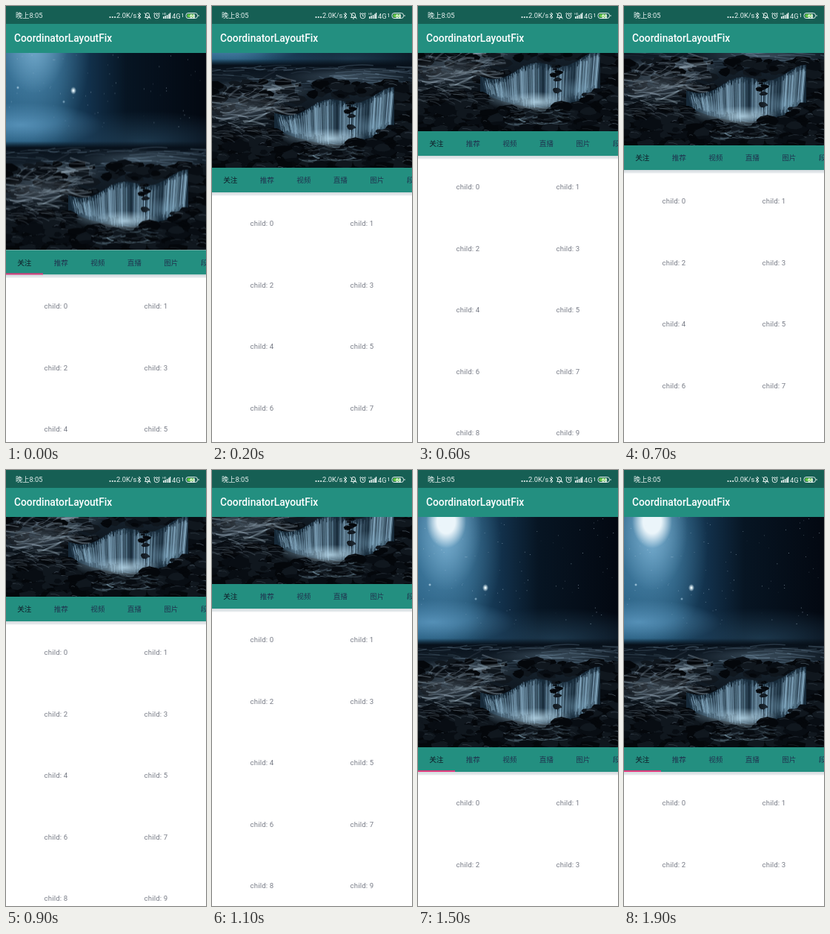
Write an HTML page with a canvas that moves like this. It is 270 px wide and 585 px high and loops after 2 s.

```html
<!DOCTYPE html>
<html lang="zh">
<head>
<meta charset="utf-8">
<style>
html, body { margin: 0; width: 100%; height: 100%; overflow: hidden; background: #fff; }
#stage { position: relative; width: 270px; height: 585px; overflow: hidden; background: #fff;
  font: 9.625px Roboto, "Noto Sans CJK SC", "Noto Sans CJK", sans-serif; }
#stage div, canvas, svg { position: absolute; }
#content { top: 0; left: 0; width: 270px; }
#photo { top: 62px; left: 0; }
#tabs { top: 372px; width: 270px; height: 33px; background: #238f80; overflow: hidden; }
#tabs div { width: 49.5px; text-align: center; line-height: 33px; color: #20344f; white-space: nowrap; }
#tabs div.on { color: #101a26; }
#indicator { top: 403.4px; width: 49.5px; height: 1.6px; background: #e0397c; }
#shadow { top: 405px; width: 270px; height: 5px; background: linear-gradient(#d3d9dd, #e6eaed 70%, #fff); }
.child { width: 135px; text-align: center; line-height: 14px; color: #777b86; letter-spacing: .018em; }
#status { top: 0; width: 270px; height: 24px; background: #165f54; }
#bar { top: 24px; width: 270px; height: 38.5px; background: #238f80; color: #fff;
  font-size: 13.75px; font-weight: 500; line-height: 39px; text-indent: 11px; }
svg { top: 0; left: 0; }
</style>
</head>
<body>
<div id="stage">
  <div id="content">
    <canvas id="photo" width="270" height="310"></canvas>
    <div id="tabs"></div>
    <div id="shadow"></div>
    <div id="indicator"></div>
  </div>
  <div id="status"></div>
  <div id="bar">CoordinatorLayoutFix</div>
  <svg width="270" height="24" fill="none" stroke="#e4efed" stroke-width="1">
    <g fill="#e8f2f0" stroke="none" font-size="9.3">
      <text x="13" y="16.3" textLength="">晚上8:05</text>
      <circle cx="140.5" cy="15" r="1.1"/><circle cx="143.8" cy="15" r="1.1"/><circle cx="147.1" cy="15" r="1.1"/>
      <text id="speed" x="149" y="16.3">2.0K/s</text>
      <text x="224" y="16.6">4G</text>
      <text x="211" y="12" font-size="4">HD</text>
      <path d="M212 17v-3h1.6v3zM214.4 17v-4h1.6v4zM216.8 17v-5h1.6v5zM219.2 17v-6.5h1.6v6.5zM221 17v-8h1.3v8z"/>
    </g>
    <path d="M177.5 10.5l4.5 4.5-2.2 2v-8l2.2 2-4.5 4.5" stroke-width=".9"/>
    <path d="M187.5 15.5h7l-1-1.5v-2.2a2.5 2.5 0 0 0-5 0v2.2zM190 17h2M186.5 9.5l9 7.5"/>
    <circle cx="203.5" cy="13.3" r="3.4"/>
    <path d="M203.5 11.2v2.3h1.6M199.2 10.6l1.8-1.6M207.8 10.6l-1.8-1.6"/>
    <path d="M238.5 15v-5l-1 1.2" stroke-width=".8"/>
    <rect x="243" y="9.5" width="15.5" height="7" rx="3"/>
    <path d="M260 12v2"/>
    <rect x="244.5" y="10.8" width="10" height="4.5" rx="1.8" fill="#62c744" stroke="none"/>
    <text x="248" y="15.5" font-size="6.5" font-weight="700" fill="#fff" stroke="none">68</text>
  </svg>
</div>
<script>
const $ = id => document.getElementById(id);
const content = $('content');

function addBox(parent, text, left, top, className) {
  const box = document.createElement('div');
  box.textContent = text;
  box.className = className;
  box.style.left = left + 'px';
  box.style.top = top + 'px';
  parent.append(box);
}
['关注', '推荐', '视频', '直播', '图片', '段子'].forEach((label, i) =>
  addBox($('tabs'), label, i * 49.5, 0, i ? '' : 'on'));
for (let i = 0; i < 14; i++)
  addBox(content, 'child: ' + i, i % 2 * 135, 440 + (i >> 1) * 82.5, 'child');

let seed = 7;
const rnd = (a = 1, b = 0) => {
  seed = (seed * 16807) % 2147483647;
  return b + (a - b) * seed / 2147483647;
};

function drawPhoto(g) {
  const rgba = (color, alpha) => `rgba(${color},${alpha})`;
  const fill = (color, x, y, w, h) => { g.fillStyle = color; g.fillRect(x, y, w, h); };
  const glow = (x, y, rx, ry, color, alpha, core = 0) => {
    g.save();
    g.translate(x, y);
    g.scale(rx, ry);
    const shade = g.createRadialGradient(0, 0, core, 0, 0, 1);
    shade.addColorStop(0, rgba(color, alpha));
    shade.addColorStop(1, rgba(color, 0));
    fill(shade, -1, -1, 2, 2);
    g.restore();
  };
  const blob = (x, y, rx, ry, color) => {
    g.beginPath();
    for (let i = 0; i < 9; i++) {
      const a = i / 9 * Math.PI * 2, r = rnd(1.1, .65);
      g.lineTo(x + Math.cos(a) * rx * r, y + Math.sin(a) * ry * r);
    }
    g.fillStyle = color;
    g.fill();
  };
  const streak = (x, y, dx, dy, bend, color, width) => {
    g.beginPath();
    g.moveTo(x, y);
    g.quadraticCurveTo(x + dx / 2, y + dy / 2 + bend, x + dx, y + dy);
    g.strokeStyle = color;
    g.lineWidth = width;
    g.stroke();
  };
  const rocks = (count, x0, x1, y0, y1, size) => {
    for (let i = 0; i < count; i++) {
      const x = rnd(x1, x0), y = rnd(y1, y0), w = rnd(size, size / 3);
      blob(x, y, w, w * .5, ['#04070b', '#080d13', '#10171e'][i % 3]);
      if (i % 2) streak(x - w / 2, y - w * .25, w * .8, rnd(3, -2), -2, rgba('130,150,166', rnd(.55, .1)), rnd(1.2, .4));
    }
  };

  // Night sky
  const sky = g.createLinearGradient(0, 0, 270, 0);
  [[0, '#245a7c'], [.25, '#1d4c6b'], [.42, '#12304a'], [.6, '#071523'], [1, '#030811']]
    .forEach(([stop, color]) => sky.addColorStop(stop, color));
  fill(sky, 0, 0, 270, 180);
  glow(38, 45, 75, 130, '92,155,195', .75);
  glow(38, 15, 48, 85, '140,190,220', .75);
  glow(38, 7, 27, 36, '235,245,250', 1, .45);
  glow(20, 142, 110, 30, '95,155,195', .8);
  glow(185, 165, 150, 42, '40,75,100', .65);
  for (let i = 0; i < 90; i++) fill(rgba('190,215,230', rnd(.55, .1)), rnd(270), rnd(145), rnd(1.2, .5), 1);
  glow(91, 96, 4, 5, '235,250,255', 1, .15);
  glow(16, 92, 2, 2, '210,235,250', .9);
  glow(78, 111, 2, 2, '180,215,235', .8);

  // Sea and horizon
  const sea = g.createLinearGradient(0, 164, 0, 310);
  [[0, 'rgba(5,11,18,0)'], [.06, '#07101a'], [.25, '#17232e'], [.55, '#0c141c'], [1, '#05080c']]
    .forEach(([stop, color]) => sea.addColorStop(stop, color));
  fill(sea, 0, 164, 270, 146);
  for (let i = 0; i < 110; i++)
    streak(rnd(270, -20), rnd(205, 174), rnd(50, 12), rnd(5, -3), rnd(4, -4), rgba('125,155,178', rnd(.35, .06)), rnd(2, .5));
  glow(185, 187, 90, 13, '120,150,172', .4);
  glow(60, 208, 75, 17, '145,165,180', .45);
  rocks(70, -5, 120, 195, 240, 15);
  for (let i = 0; i < 85; i++) {
    const x = rnd(90, -20);
    streak(x, 240 - x * .3 + rnd(25, -30), rnd(45, 12), rnd(10, -14), rnd(6, -6), rgba('165,185,200', rnd(.38, .06)), rnd(3, .6));
  }
  glow(40, 230, 60, 20, '145,165,182', .35);
  rocks(55, 135, 280, 196, 214, 16);
  rocks(60, 238, 275, 200, 262, 16);

  // Basin and curtains of water
  const crest = x => 238 - (x - 85) * .19 + 6 * Math.sin(x / 14);
  const base = x => 258 + 20 * Math.sin((x - 82) / 166 * Math.PI);
  g.beginPath();
  for (let x = 84; x <= 246; x += 3) g.lineTo(x, crest(x));
  for (let x = 246; x >= 84; x -= 3) g.lineTo(x, base(x));
  g.fillStyle = '#162938';
  g.fill();
  for (let i = 0; i < 290; i++) {
    const x = rnd(245, 86), top = crest(x) + rnd(9, -1);
    const gap = Math.sin(x / 7) + Math.sin(x / 17) < -.8;
    streak(x, top, (165 - x) * .05, base(x) - top + rnd(2, -12), 0,
      rgba('155,195,220', rnd(gap ? .15 : .5, .06)), rnd(2, .5));
  }
  rocks(10, 180, 194, 218, 265, 8);
  glow(160, 271, 48, 14, '185,218,236', .85);
  glow(115, 265, 28, 16, '150,190,215', .45);
  glow(215, 255, 32, 17, '130,175,202', .4);

  // Foreground rocks
  rocks(95, -5, 88, 258, 312, 19);
  rocks(65, 60, 150, 279, 314, 17);
  rocks(95, 178, 275, 276, 314, 18);
  rocks(25, 225, 275, 256, 285, 15);
  for (let i = 0; i < 55; i++)
    streak(rnd(190, 115), rnd(302, 276), rnd(24, 6), rnd(5, -4), 2, rgba('145,180,200', rnd(.35, .05)), rnd(2, .5));
  for (let i = 0; i < 45; i++)
    streak(rnd(80, -10), rnd(270, 251), rnd(30, 8), rnd(8, -2), -3, rgba('150,170,185', rnd(.3, .05)), rnd(1.8, .5));
}
drawPhoto($('photo').getContext('2d'));

// Top edge of the tab row over time
const path = [[0, 327.5], [100, 268], [200, 217], [300, 180], [400, 154], [500, 152], [600, 168],
  [700, 187], [900, 170], [1000, 159], [1100, 153], [1200, 372], [2000, 372]];

function tabTop(t) {
  const i = path.findIndex(([time]) => time > t);
  const [t0, y0] = path[i - 1], [t1, y1] = path[i];
  return y0 + (y1 - y0) * (t - t0) / (t1 - t0);
}

function render(now) {
  const t = Math.floor(now % 2000 / 100) * 100;
  content.style.transform = `translateY(${tabTop(t) - 372}px)`;
  const hidden = t >= 100 && t < 400 || t >= 500 && t < 1200;
  $('indicator').style.visibility = hidden ? 'hidden' : 'visible';
  $('speed').textContent = (t < 1700 ? '2.0' : '0.0') + 'K/s';
}
const start = performance.now();
function tick() {
  render(performance.now() - start);
  requestAnimationFrame(tick);
}
render(0);
requestAnimationFrame(tick);
</script>
</body>
</html>
```
